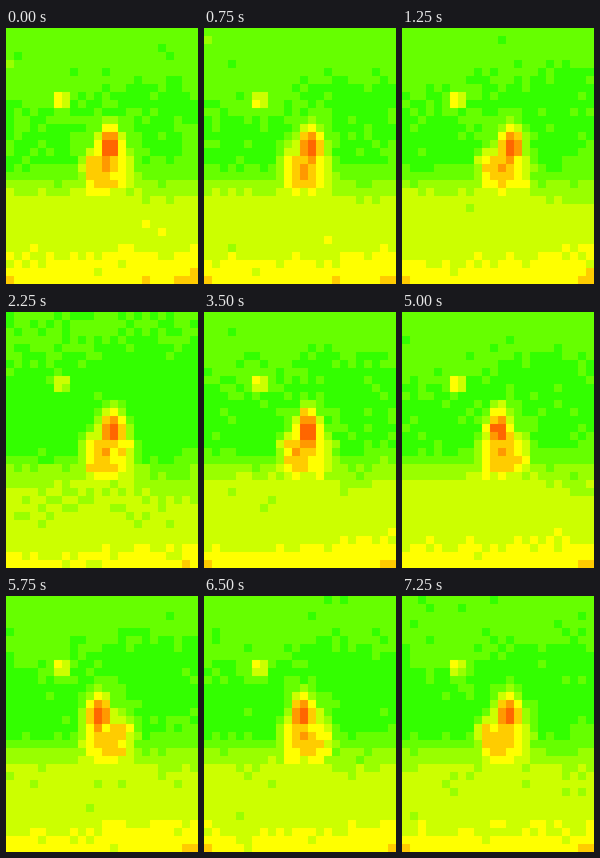
A matplotlib script that plays this animation: 240 px wide and 320 px high, repeating every 7.5 s.

```python
import numpy as np
import matplotlib.pyplot as plt
from matplotlib.animation import FuncAnimation
from matplotlib.colors import ListedColormap

COLS, ROWS, FRAMES, STEP = 24, 32, 30, 250
PALETTE = ["#33ff00", "#66ff00", "#99ff00", "#ccff00",
           "#ffff00", "#ffcc00", "#ff9900", "#ff6600"]

# Key points of the slow sway and of the sensor's drift.
KEYS = [0, 5, 9, 14, 18, 23, 29]
HEAD_X = [12.5, 13.1, 12.8, 12.5, 12, 11.1, 12.8]
CHEST_X = [11.5, 12, 11.6, 11.3, 12, 12.8, 11.5]
DRIFT = [0.2, 0.05, -0.3, 0, 0.05, 0, -0.05]

yy, xx = np.mgrid[0:ROWS, 0:COLS]


def blob(x, y, w, h, heat):
    return heat * np.exp(-((xx - x) / w) ** 2 - ((yy - y) / h) ** 2)


def beyond(distance, limit):
    return np.maximum(0, np.abs(distance) - limit)


def make_room():
    """Cool wall above, warm floor below, a lamp and uneven patches."""
    heat = np.interp(yy, [0, 4, 9, 16, 18, 19, 21, 27, 31],
                     [0.9, 0.75, 0.3, 0.15, 0.85, 1.75, 2.7, 3.1, 4])
    heat += blob(4, 7, 6, 3, 0.25) + blob(17, 7.5, 6, 3, -0.3)
    heat += blob(23, 17, 2.5, 2.5, 0.7)
    heat += blob(12, 19.5, 3, 2, 0.6) + blob(20, 20, 4, 1.5, -0.5)
    heat += blob(12.6, 15, 2.8, 3.8, 1.4)
    heat += blob(0, 31, 1.5, 1.5, 0.7) + blob(23, 31, 1.5, 1.5, 0.7)
    heat += (yy > 26) * (xx - 12) * 0.015
    return heat + blob(6.4, 8.5, 0.9, 0.9, 5)


def figure_heat(head_x, chest_x):
    """Hot head over a broad body whose warm centre shifts sideways."""
    core = np.interp(yy, [10, 12, 13, 14, 15, 16, 18, 20],
                     [0, 4.2, 6, 7.1, 7, 5.5, 4, 0])
    head = core - 3.2 * beyond(xx - head_x, 0.5)
    body = 4.1 - 2 * beyond(xx - 12.25, 2.35) - 1.5 * beyond(yy - 17.7, 1.8)
    body += blob(chest_x, 17.5, 1.5, 2.2, 1.4)
    return np.maximum(head, body)


ROOM = make_room()


def levels(frame):
    rng = np.random.default_rng(400 + frame)
    head_x, chest_x, drift = (np.interp(frame, KEYS, k)
                              for k in (HEAD_X, CHEST_X, DRIFT))
    checker = 0.06 * (1 - 2 * ((xx + yy + frame) % 2))
    heat = np.maximum(ROOM + drift, figure_heat(head_x, chest_x))
    heat += checker + rng.normal(0, 0.18, heat.shape)
    return np.clip(np.rint(heat), 0, len(PALETTE) - 1)


fig = plt.figure(figsize=(2.4, 3.2), dpi=100)
ax = fig.add_axes([0, 0, 1, 1])
ax.axis("off")
image = ax.imshow(levels(0), cmap=ListedColormap(PALETTE), vmin=-0.5, vmax=7.5,
                  interpolation="nearest", aspect="auto")


def update(frame):
    image.set_data(levels(frame))
    return [image]


anim = FuncAnimation(fig, update, frames=FRAMES, interval=STEP,
                     repeat=True, repeat_delay=0)
plt.show()
```
